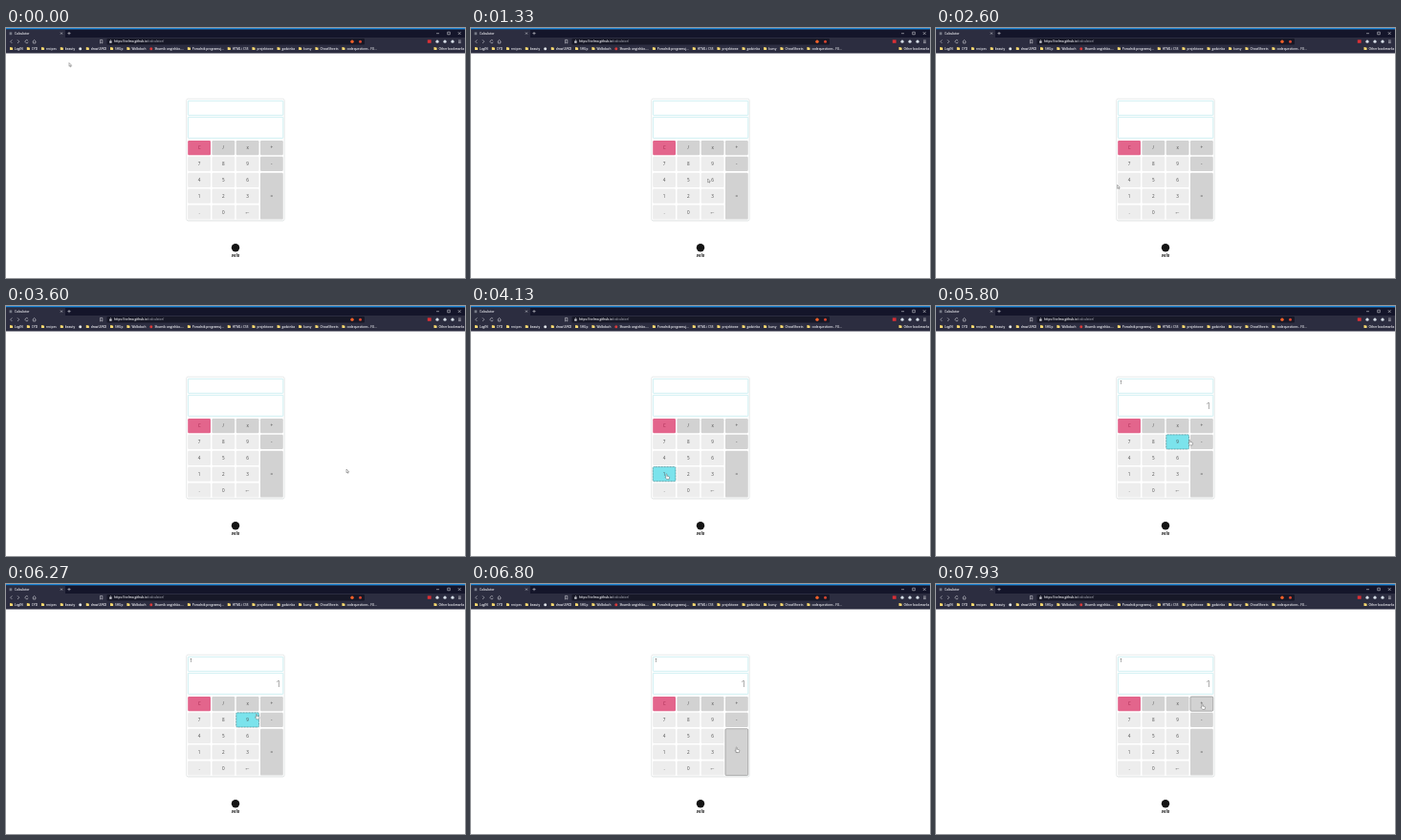
An HTML page for the animation above (8 s loop, 480 px wide and 262 px high).

```html
<!DOCTYPE html>
<html lang="en">
<head>
<meta charset="utf-8">
<title>Calculator</title>
<style>
  html, body { margin: 0; width: 100%; height: 100%; overflow: hidden; background: #fff; }
  svg { display: block; width: 100%; height: 100%; }
  text { font-family: "Open Sans", "Noto Sans", sans-serif; }
  .chrome text { font-size: 3.15px; font-weight: 600; fill: #f0f0f4; }
  .icons { fill: none; stroke: #dcdce2; stroke-width: .55; }
  .key text { font-size: 4.6px; fill: #4a4a4a; text-anchor: middle; }
</style>
</head>
<body>
<svg id="stage" viewBox="0 0 480 262"></svg>
<script>
const NS = 'http://www.w3.org/2000/svg';
const LOOP = 8000, FOCUS_AT = 3600, PRESS_AT = 4865;
const stage = document.getElementById('stage');

function add(parent, tag, attrs = {}, content = '') {
  const node = document.createElementNS(NS, tag);
  for (const name in attrs) node.setAttribute(name, attrs[name]);
  node.textContent = content;
  parent.appendChild(node);
  return node;
}
const rect = (parent, x, y, width, height, fill, more) =>
  add(parent, 'rect', { x, y, width, height, fill, ...more });
const circle = (parent, cx, cy, r, fill) => add(parent, 'circle', { cx, cy, r, fill });
const label = (parent, x, y, content, more) => add(parent, 'text', { x, y, ...more }, content);

function drawBookmark(g, x, name) {
  if (!name) {
    circle(g, x + 1.4, 21.7, 1.5, '#dfe3e8');
    return x + 7.5;
  }
  if (name.startsWith('Słownik')) {
    circle(g, x + 1.4, 21.7, 1.5, '#d83a3a');
  } else {
    rect(g, x, 20.1, 1.7, 1, '#e2bd4c');
    rect(g, x, 20.6, 3.1, 2.5, '#f5d873', { rx: .3 });
  }
  return x + 9 + label(g, x + 5, 22.8, name).getComputedTextLength();
}

function drawBrowser() {
  const g = add(stage, 'g', { class: 'chrome' });
  const frame = '#14152a', toolbar = '#2c2d40';
  rect(g, 0, 0, 480, 10, frame);
  rect(g, 0, 0, 480, 1.4, '#1f86d6');
  rect(g, 0, 1.8, 62, 9, toolbar, { rx: 1 });
  rect(g, 0, 10, 480, 16.5, toolbar);
  rect(g, 105.5, 11, 269.5, 6.4, '#171827', { rx: 1 });

  rect(g, 3.6, 4.4, 2.6, 2.8, '#777b88');
  label(g, 9, 7, 'Calculator');
  const address = label(g, 113, 15.3, 'https://velmo.github.io');
  add(address, 'tspan', { fill: '#9799a5' }, '/calculator/');
  rect(g, 108.2, 13.7, 2.4, 2, '#cfd0d6');

  add(g, 'path', { class: 'icons', d:
    'M57 4.6l2 2m0-2l-2 2M64.4 5.6h3.2M66 4v3.2' +
    'M450 5.7h3M461.7 4.2h2.6v2.6h-2.6zM472.8 4.2l2.8 2.8m0-2.8l-2.8 2.8' +
    'M6.4 12.4l-1.8 1.8 1.8 1.8M12 12.4l1.8 1.8-1.8 1.8' +
    'M23 13.3a1.6 1.6 0 1 0 .2 1.4M27.8 14.2l1.8-1.7 1.8 1.7M28.4 14v2h2.4v-2' +
    'M98.5 12.4h2.3v3.7l-1.15-1-1.15 1z' +
    'M109 13.7v-.7q.5-1 1 0v.7' +
    'M473 13h2.8M473 14.3h2.8M473 15.6h2.8' });
  circle(g, 362, 14.2, 1.7, '#f0602a');
  circle(g, 370.5, 14.2, 1.5, '#d8452f');
  rect(g, 440.8, 12.4, 3.8, 3.4, '#d92f35');
  for (let x = 451; x < 470; x += 8) circle(g, x, 14.2, 1.6, '#d4dbe4');

  // An empty name is a bookmark shown as an icon only.
  ['LogIN', 'CYD', 'recipes', 'beauty', '', 'drawUVKD', 'SHUp', 'Wolbdach',
   'Słownik angielsko-...', 'Poradnik programuj...', 'HTML i CSS', 'projektowe',
   'gadzinka', 'kursy', 'CheatSheets', 'codequestions - FU...'
  ].reduce((x, name) => drawBookmark(g, x, name), 4);
  drawBookmark(g, 447.5, 'Other bookmarks');
}

function drawCalculator() {
  rect(stage, 188.7, 74.6, 102.6, 128, '#e3e6e6', { rx: 2, opacity: .7 });
  rect(stage, 188.7, 74.2, 102.4, 127.6, '#fff', { rx: 1.6, stroke: '#d3d9d9', 'stroke-width': .5 });
  const border = { stroke: '#bdebee', 'stroke-width': .7, rx: .5 };
  rect(stage, 190.4, 76.4, 99.4, 15, '#fff', border);
  rect(stage, 190.4, 93.4, 99.4, 22, '#fff', border);
}

function drawKey(name, col, row) {
  const pitch = 16.85;
  const x = 190.2 + col * 25.25, y = 118 + row * pitch;
  const w = 23.8, h = 15.2 + (name === '=' ? 2 * pitch : 0);
  const isDigit = row > 0 && col < 3, isClear = name === 'C';
  const fill = isClear ? '#e3658c' : isDigit ? '#ededed' : '#d2d2d2';
  const g = add(stage, 'g', { class: 'key' });
  const face = rect(g, x, y, w, h, fill, { rx: 1.2, 'stroke-width': .6 });
  const text = label(g, x + w / 2, y + h / 2 + 1.6, name);
  if (isClear) text.style.fill = '#a52850';
  if (name === '←') text.style.fontSize = '6px';
  return { x, y, w, h, face, fill, isDigit };
}

function paintKey({ face, fill, isDigit }, hovered) {
  const lit = hovered && isDigit;
  face.setAttribute('fill', lit ? '#7be3ec' : fill);
  face.setAttribute('stroke', lit ? '#2c666c' : hovered ? '#858585' : 'none');
  face.setAttribute('stroke-dasharray', lit ? '1 .5' : 'none');
}

// Pointer moves: start, end, x, y, sideways bow. It rests in between.
const origin = [66, 36.5];
const moves = [
  [270, 1130, 247.6, 147.5, -25], [1130, 1330, 247.6, 158, 0],
  [1540, 1870, 178.5, 152.5, 0], [2340, 2800, 197, 172.5, 0],
  [2940, 3330, 421.5, 165, 8], [3400, 3600, 356, 171, 0],
  [3600, 4130, 204, 176, -16], [4200, 4530, 206, 178, 4],
  [5130, 5800, 264.8, 140.3, 0], [5800, 6000, 278, 124, 0],
  [6000, 6800, 277.2, 171, 22], [7070, 7330, 277.2, 148.5, 0],
  [7400, 7600, 278, 125.8, 0]
];

function pointerAt(t) {
  let [x, y] = origin;
  for (const [start, end, toX, toY, bow] of moves) {
    if (t <= start) break;
    const k = Math.min(1, (t - start) / (end - start));
    const ease = k * k * (3 - 2 * k);
    const dx = toX - x, dy = toY - y;
    const side = bow * Math.sin(Math.PI * ease) / Math.hypot(dx, dy);
    x += dx * ease - dy * side;
    y += dy * ease + dx * side;
  }
  return [x, y];
}

drawBrowser();
drawCalculator();
const keys = ['C/x+', '789-', '456=', '123', '.0←'].flatMap((line, row) =>
  [...line].map((name, col) => drawKey(name, col, row)));

const result = add(stage, 'g', { fill: '#444' });
label(result, 192.2, 82.2, '1', { 'font-size': 5 });
label(result, 287.7, 107.8, '1', { 'font-size': 9.5, 'font-weight': 300, 'text-anchor': 'end' });

circle(stage, 240, 230.2, 4.2, '#151515');
label(stage, 240, 239.6, 'velo', {
  'font-size': 4.3, 'font-weight': 700, 'font-style': 'italic', 'text-anchor': 'middle', fill: '#222'
});

const pointer = add(stage, 'g', { fill: '#fff', stroke: '#444', 'stroke-width': .4, 'stroke-linejoin': 'round' });
const arrow = add(pointer, 'path', { d: 'M0 0v3.8l.9-.8.6 1.3.6-.3-.6-1.2h1.2z' });
const hand = add(pointer, 'path', {
  d: 'M0 .4q.5-.8 1 0v1.8l2 .5q.7.2.6 1l-.4 1.9H.7L-.9 3.6q-.1-.8.9-.2z'
});
const show = (node, visible) => node.setAttribute('visibility', visible ? 'visible' : 'hidden');

function render(t) {
  const [x, y] = pointerAt(t);
  const over = t < FOCUS_AT ? null : keys.find(k =>
    x >= k.x && x <= k.x + k.w + .9 && y >= k.y && y <= k.y + k.h);
  keys.forEach(key => paintKey(key, key === over));
  show(result, t >= PRESS_AT);
  show(arrow, !over);
  show(hand, over);
  pointer.setAttribute('transform', `translate(${x} ${y})`);
}

const start = performance.now();
function tick() {
  render((performance.now() - start) % LOOP);
  requestAnimationFrame(tick);
}
render(0);
requestAnimationFrame(tick);
</script>
</body>
</html>
```
